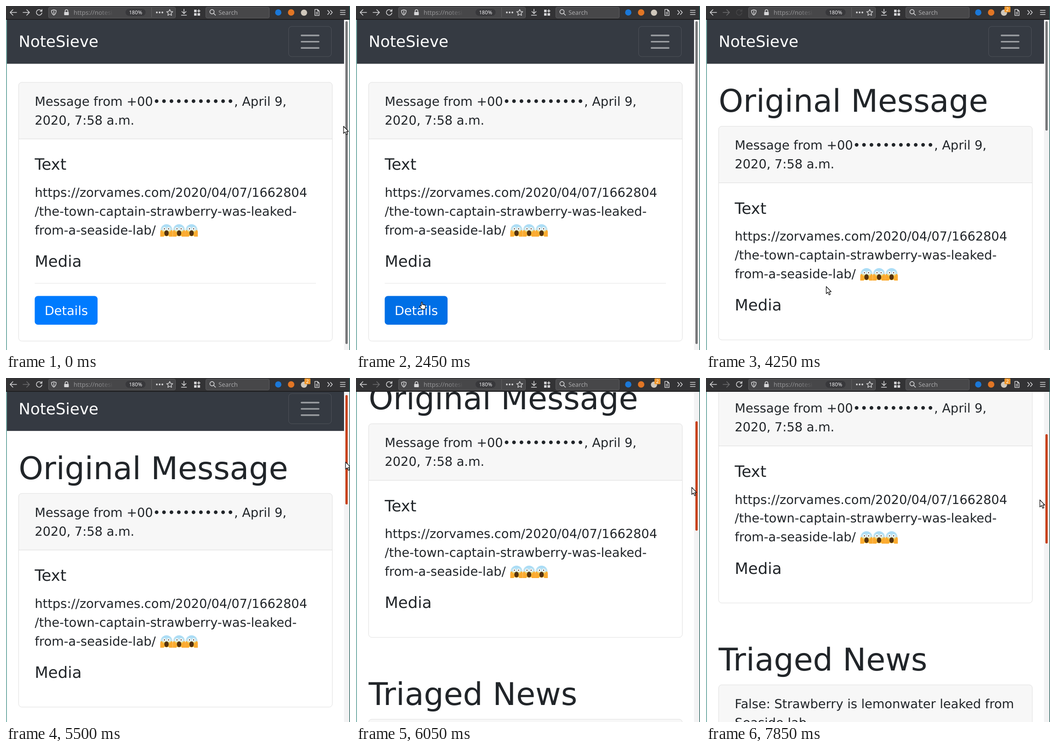
An HTML page that plays this animation: 748 px wide and 748 px high, repeating every 8 s.

```html
<!DOCTYPE html>
<html lang="en">
<head>
<meta charset="utf-8">
<title>Message check</title>
<style>
  html, body { margin: 0; width: 100%; height: 100%; overflow: hidden; background: #fff; }
  svg { display: block; width: 100vw; height: 100vh; }
  text { font-family: "DejaVu Sans", sans-serif; fill: #212529; text-rendering: geometricPrecision; }
  .bar text { font: 13.3px "Noto Sans", "Open Sans", sans-serif; }
  .icon { fill: none; stroke: #d6d6d8; stroke-width: 1.6; stroke-linecap: round; stroke-linejoin: round; }
</style>
</head>
<body>
<svg id="stage" viewBox="0 0 748 748">
  <defs>
    <linearGradient id="fade" gradientUnits="userSpaceOnUse" x1="200" x2="236" y1="0" y2="0">
      <stop offset="0" stop-color="#949496"/><stop offset="1" stop-color="#474749"/>
    </linearGradient>
    <linearGradient id="skin" x2="0" y2="1">
      <stop offset="0.1" stop-color="#a9dcf6"/><stop offset="0.45" stop-color="#c9e6ee"/>
      <stop offset="0.68" stop-color="#fccb3a"/><stop offset="1" stop-color="#fbc02d"/>
    </linearGradient>
    <clipPath id="view"><rect x="2" y="30" width="733" height="718"/></clipPath>
    <g id="scream">
      <circle cy="-.5" r="13" fill="url(#skin)"/>
      <g fill="#fff"><circle cx="-4.5" cy="-3.5" r="3.3"/><circle cx="4.5" cy="-3.5" r="3.3"/></g>
      <g fill="#3b2a20"><circle cx="-4.5" cy="-3.5" r="1.2"/><circle cx="4.5" cy="-3.5" r="1.2"/></g>
      <ellipse cy="6" rx="4.8" ry="6.2" fill="#543210"/>
      <g fill="#fbab30">
        <path id="palm" d="M-13.6 13.5V3.5q.2-3.8 2.6-4.2q2 0 2 2.4q2.6.4 2.8 3.3q2.4 3 .5 8.5z"/>
        <use href="#palm" transform="scale(-1 1)"/>
      </g>
    </g>
  </defs>

  <rect width="748" height="748" fill="#fff"/>
  <g clip-path="url(#view)">
    <g id="list"></g>
    <g id="detail"></g>
  </g>
  <rect x="735" y="30" width="12" height="718" fill="#f3f3f4"/>
  <rect id="thumb" x="738" width="5" rx="2.5"/>
  <rect y="30" width="2" height="718" fill="#80b4af"/>

  <g class="bar">
    <rect width="748" height="30" fill="#333335"/>
    <rect y="28.5" width="748" height="1.5" fill="#19191b"/>
    <g fill="#474749" stroke="#5c5c5f">
      <rect x="92.5" y="2.5" width="276" height="23.5" rx="3"/>
      <rect x="434.5" y="2.5" width="138" height="23.5" rx="3"/>
    </g>
    <g class="icon">
      <path d="M23 14H9M15 8l-6 6 6 6"/>
      <path id="forward" d="M37 14H51M45 8l6 6-6 6"/>
      <path id="reload" d="M77 10.5A6 6 0 1 0 78 15M78.2 7.5v4h-4"/>
      <path id="stop" d="M67 9l10 10M77 9L67 19"/>
      <path d="M104 8.2l5 1.6q.3 7-5 10-5.3-3-5-10zM104 11v6" stroke-width="1.5"/>
      <path d="M128.5 13v-2a3 3 0 0 1 6 0v2"/>
      <path d="M356 7.5l2 4.3 4.7.6-3.5 3.2.9 4.7-4.1-2.3-4.1 2.3.9-4.7-3.5-3.2 4.7-.6z" stroke-width="1.4"/>
      <path d="M387 7v9M382.5 12l4.5 4.5 4.5-4.5M381.5 20h11"/>
      <circle cx="448" cy="12.5" r="4.6"/><path d="M451.5 16l4 4"/>
      <path d="M671.5 7.5h6l3.5 3.5v9.5h-9.5zM677.5 7.5v3.5h3.5M674 14h4.5M674 17h4.5" stroke-width="1.3"/>
      <path d="M699.5 9.5l4 4.5-4 4.5M705.5 9.5l4 4.5-4 4.5"/>
      <path d="M727 9.5h10.5M727 14h10.5M727 18.5h10.5"/>
    </g>
    <path d="M316.5 4v20" stroke="#77777a" stroke-dasharray="1.5 1.5"/>
    <g fill="#d6d6d8">
      <rect x="126.5" y="13" width="10" height="7" rx="1"/>
      <circle cx="328" cy="14" r="1.9"/><circle cx="334" cy="14" r="1.9"/><circle cx="340" cy="14" r="1.9"/>
      <path d="M409 8h5.5v5.5H409zM409 15.5h5.5V21H409zM416.5 15.5h5.5V21h-5.5zM418.3 7.5h2v2.3h2.3v2h-2.3v2.3h-2v-2.3H416v-2h2.3z"/>
    </g>
    <text x="147" y="18.5" style="fill:url(#fade)">https://notesi</text>
    <rect x="260" y="6" width="43.5" height="15.5" rx="7.7" fill="#38383b"/>
    <text x="281.8" y="18" text-anchor="middle" style="fill:#f4f4f5;font-size:11.3px">180%</text>
    <text x="462" y="18.5" style="fill:#a8a8aa">Search</text>
    <circle cx="592" cy="14" r="6.8" fill="#1b78d8"/>
    <circle cx="620" cy="14" r="7" fill="#e27625"/>
    <circle cx="648" cy="14.5" r="6.8" fill="#cfc7bb"/>
    <g id="badge">
      <rect x="649" y="1" width="13" height="12.5" rx="1.5" fill="#f0972c"/>
      <text x="655.5" y="11" text-anchor="middle" style="fill:#fff;font-size:10.5px">2</text>
    </g>
  </g>
  <rect x="746.7" width="1.3" height="748" fill="#2a625d"/>

  <g id="cursor" fill="#fff" stroke="#111" stroke-width="1.3" stroke-linejoin="round">
    <path id="arrow" d="M0 0V15.5L3.6 12.3 6.2 18.2 8.7 17.1 6.2 11.3H10.7Z"/>
    <path id="beam" fill="none" d="M-3-8H-1Q0-8 0-7V7Q0 8 1 8H3M3-8H1Q0-8 0-7M0 7Q0 8-1 8H-3"/>
    <path id="hand" d="M-1.5 9V1.5q1.2-2.5 2.5 0V6q1-1 2.2.3 1.2-.8 2.1.5 2.2-.3 2.2 1.7v3.5l-1.5 4H-.5l-4.5-6q0-2 1.8-1.5z"/>
  </g>
</svg>

<script>
const LOOP = 8000, STEP = 50;
const $ = id => document.getElementById(id);
const show = (id, on) => $(id).setAttribute('display', on ? 'inline' : 'none');
const set = (id, attrs) => {
  for (const key in attrs) $(id).setAttribute(key, attrs[key]);
};

const label = (x, y, size, words, fill = '#212529') =>
  `<text x="${x}" y="${y}" style="font-size:${size}px;fill:${fill}">${words}</text>`;

const NAVBAR = `<rect x="2" y="30" width="733" height="95.6" fill="#353a42"/>
  ${label(27.5, 89.3, 34, 'NoteSieve', '#fff')}
  <rect x="614.5" y="44.4" width="93" height="65.6" rx="6.8" fill="none" stroke="#fff" stroke-opacity=".12"/>
  <path d="M642.5 64h37.4M642.5 77.6h37.4M642.5 91.2h37.4" stroke="#9a9da1" stroke-width="3.4" stroke-linecap="round"/>`;

function card(top, height, lines, body = '') {
  return `<g transform="translate(0 ${top})">
    <path d="M27.5 124V7.3q0-6.8 6.8-6.8H702.7q6.8 0 6.8 6.8V124z" fill="#f7f7f7"/>
    <path d="M27.5 123.5H709.5" stroke="#dcdcdc"/>
    <rect x="27.5" y=".5" width="682" height="${height}" rx="6.8" fill="none" stroke="#dfdfdf"/>
    ${lines.map((line, i) => label(62.5, 51.2 + 40.8 * i, 27.2, line)).join('')}
    ${body}</g>`;
}

const HEADER = ['Message from +00•••••••••••, April 9,', '2020, 7:58 a.m.'];
const LINK = [
  'https://zorvames.com/2020/04/07/1662804',
  '/the-town-captain-strawberry-was-leaked-',
  'from-a-seaside-lab/'
];
const MESSAGE = label(62.5, 190.6, 34, 'Text')
  + LINK.map((line, i) => label(62.5, 249.4 + 40.8 * i, 27.2, line)).join('')
  + [349, 376.3, 403.5].map(x => `<use href="#scream" x="${x}" y="322.5"/>`).join('')
  + label(62.5, 401.4, 34, 'Media');
const BUTTON = `<path d="M62.5 437.5H674" stroke="#e4e4e4"/>
  <rect id="ring" x="59.8" y="462.3" width="142" height="68" rx="9" fill="none" stroke="#80bdff" stroke-width="5.4"/>
  <rect id="button" x="62.5" y="465" width="136.6" height="62.6" rx="6.8"/>
  ${label(83.9, 506.4, 27.2, 'Details', '#fff')}`;

$('list').innerHTML = NAVBAR + card(165.5, 562.5, HEADER, MESSAGE + BUTTON);
$('detail').innerHTML = NAVBAR
  + label(27.5, 230, 68, 'Original Message')
  + card(261, 464.5, HEADER, MESSAGE)
  + label(27.5, 873, 68, 'Triaged News')
  + card(903.5, 400, ['False: Strawberry is lemonwater leaked from', 'Seaside lab']);

const clamp = p => Math.min(1, Math.max(0, p));
const smooth = p => p * p * (3 - 2 * p);
const easeIn = p => p * p;
const easeOut = p => p * (2 - p);

// Pointer moves: start, end, from, to, easing
const MOVES = [
  [650, 1150, [734, 261.5], [268.5, 411], smooth],
  [1800, 2450, [268.5, 411], [143.5, 643.5], smooth],
  [3950, 4250, [143.5, 643.5], [261.5, 610], easeIn],
  [4250, 4750, [261.5, 610], [745, 174], easeOut]
];

// Scroll offset while the thumb is dragged
const DRAG = [[0, 0], [5450, 4], [5500, 10.5], [5600, 45], [5700, 77.7], [5850, 105],
  [5950, 135], [6050, 162], [7750, 203], [7850, 236.8]];

const OPENED = 3950, GRABBED = 5150;
const scrollAt = t => DRAG.filter(([at]) => t >= at).pop()[1];

function pointerAt(t, scroll) {
  if (t >= GRABBED) return [739 - 0.055 * scroll, 179 + 0.363 * scroll];
  if (t >= 5000) return [760, 174];
  const [start, end, from, to, ease] = MOVES.filter(m => t >= m[0]).pop() || MOVES[0];
  const p = ease(clamp((t - start) / (end - start)));
  return from.map((v, i) => v + (to[i] - v) * p);
}

function overLink(x, y, top) {
  const row = Math.floor((y - top - 225) / 40.8);
  return x > 62 && x < ([652, 630, 417][row] || 0);
}

const overButton = (x, y) => x > 62 && x < 199 && y > 631 && y < 693;

function hoverStart() {
  let t = 1800;
  while (!overButton(...pointerAt(t, 0))) t += STEP;
  return t;
}
const HOVER = hoverStart();

function buttonColor(t) {
  if (t >= 3450 && t < 3550) return '#0062cc';
  const p = clamp((t - HOVER + STEP) / 150);
  return `rgb(0 ${123 - 18 * p} ${255 - 38 * p})`;
}

function draw(time) {
  const t = Math.floor(time / STEP) * STEP;
  const opened = t >= OPENED;
  const scroll = scrollAt(t);
  const [x, y] = pointerAt(t, scroll);

  show('list', !opened);
  show('detail', opened);
  set('detail', { transform: `translate(0 ${-scroll})` });
  set('button', { fill: buttonColor(t) });
  show('ring', t >= 3450);

  const thumbFill = t >= GRABBED ? '#c8421b' : t >= 4700 && t < 4850 ? '#555658' : '#77787a';
  set('thumb', { y: 33 + scroll * 0.376, height: opened ? 238 : 702, fill: thumbFill });

  set('forward', { opacity: t >= 3800 ? 0.35 : 1 });
  set('reload', { opacity: opened && t < 4700 ? 0.12 : 1 });
  const loading = t >= 3600 && !opened;
  show('reload', !loading);
  show('stop', loading);
  show('badge', t >= 3800);

  const hand = !opened && overButton(x, y);
  const beam = !hand && overLink(x, y, opened ? 261 : 165.5) && t < GRABBED;
  show('hand', hand);
  show('beam', beam);
  show('arrow', !hand && !beam);
  set('cursor', { transform: `translate(${x} ${y})` });
}

const begin = performance.now();
function frame() {
  draw((performance.now() - begin) % LOOP);
  requestAnimationFrame(frame);
}
frame();
</script>
</body>
</html>
```
